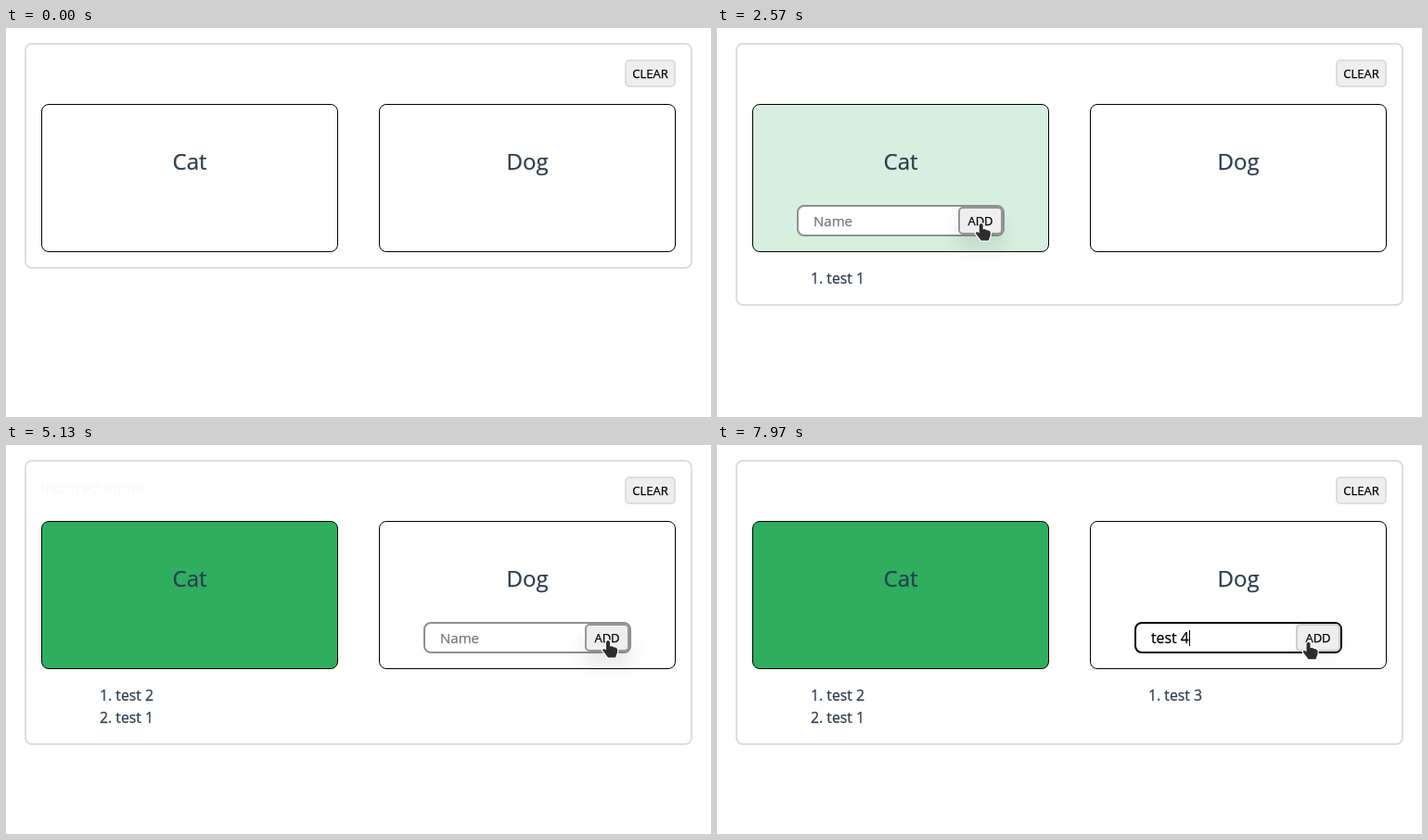
Animation of 760x420 px, one loop 8000 ms. Source, as an HTML page:

```html
<!DOCTYPE html>
<html lang="en">
<head>
<meta charset="utf-8">
<title>Cat or Dog</title>
<style>
  html, body { margin: 0; width: 100%; height: 100%; overflow: hidden; background: #fff; }
  body { position: relative; font: 15.8px/24px "Open Sans", "Noto Sans", sans-serif;
    color: #2c3e50; -webkit-text-stroke: 0.25px; }
  div, svg { position: absolute; box-sizing: border-box; white-space: pre; }
  #panel { left: 20px; top: 16px; width: 720px; border: 2px solid #ddd; border-radius: 8px; }
  .button { border: 2px solid #ddd; border-radius: 5px; background: #eee; color: #000;
    font-size: 13px; line-height: 26px; text-align: center; }
  #clear { left: 667px; top: 34px; width: 55px; height: 30px; }
  #error { left: 38px; top: 34px; font-size: 15.6px; color: #d4160f; }
  .card { top: 82px; width: 320px; height: 160px; border: 1px solid #000; border-radius: 8px; }
  .title { left: 0; right: 0; top: 49px; font-size: 24px; text-align: center; }
  .field { top: 191px; height: 34px; border: 2px solid #909090; border-radius: 8px; background: #fff; }
  .text { left: 16px; right: 60px; top: 0; height: 30px; line-height: 30px; overflow: hidden; }
  .caret { top: 7px; width: 1px; height: 17px; background: #000; }
  .field .button { right: 0; top: 0; width: 48px; height: 30px; }
  .list { top: 258px; }
  #cursor { left: 0; top: 0; width: 760px; height: 420px; }
</style>
</head>
<body>
<div id="panel"></div>
<div id="error">Incorrect input!</div>
<div id="clear" class="button">CLEAR</div>
<script>
const LOOP = 8000, KEY = 70, ADD_X = 247, ADD_Y = 211;

const cards = [
  { name: 'Cat', x: 38, enter: 900, leave: 4120 },
  { name: 'Dog', x: 402, enter: 4253, leave: Infinity }
];
// The pointer reaches (x, y) at time `at`, a word is typed, and ADD is pressed at `send`.
const visits = [
  { card: cards[0], at: 1220, x: 195, y: 200, word: 'test 1', send: 2430 },
  { card: cards[0], at: 2850, x: 224, y: 211, word: 'test 2', send: 3770 },
  { card: cards[1], at: 4330, x: 572, y: 225, word: '', send: 5110 },
  { card: cards[1], at: 6000, x: 602, y: 214, word: 'test 3', send: 6900 },
  { card: cards[1], at: 7250, x: 605, y: 218, word: 'test 4', send: 8127 }
];
const wrong = visits.findIndex(v => !v.word);
const shapes = {
  arrow: 'M0 0V16L4 12.5 6.5 18.5 9.3 17.3 6.8 11.6H11.8Z',
  hand: 'M-2 1.5Q0-1.5 2 1.5V6.5L4 6 6 7.2 8 7.4 10 9V13L8 18.5H0L-6 10.5Q-5 8-2 10.5Z',
  beam: 'M-3-7.5H-1L0-7 1-7.5H3M-3 7.5H-1L0 7 1 7.5H3M0-7V7'
};

const $ = id => document.getElementById(id);
const clamp = p => Math.max(0, Math.min(1, p));
const ease = p => p * p * (3 - 2 * p);
const mix = (a, b, p) => a + (b - a) * p;
// Eased rise after `on` and fall after `off`.
const pulse = (t, on, off, rise, fall = rise) =>
  ease(clamp(Math.min((t - on) / rise, 1 - (t - off) / fall)));

function add(parent, cls, text = '') {
  const el = document.createElement('div');
  el.className = cls;
  el.textContent = text;
  parent.append(el);
  return el;
}

const pen = document.createElement('canvas').getContext('2d');
pen.font = '15.8px "Open Sans", "Noto Sans", sans-serif';

for (const c of cards) {
  c.box = add(document.body, 'card');
  c.box.style.left = c.x + 'px';
  add(c.box, 'title', c.name);
  c.field = add(document.body, 'field');
  c.value = add(c.field, 'text');
  c.caret = add(c.field, 'caret');
  c.button = add(c.field, 'button', 'ADD');
  c.items = add(document.body, 'list');
  c.items.style.left = c.x + 63 + 'px';
  c.visits = visits.filter(v => v.card === c);
}
document.body.insertAdjacentHTML('beforeend',
  '<svg id="cursor"><g id="tip"><path id="halo" fill="none" stroke="#fff"/><path id="shape"/></g></svg>');

// Pointer stops: a rest at each spot while typing, then a rest on ADD.
const path = [[700, 262, 20]];
for (const v of visits) {
  const x = v.card.x + ADD_X;
  path.push([v.at, v.x, v.y]);
  if (v.word) path.push([v.at + 570, v.x, v.y]);
  path.push([v.send - 80, x, ADD_Y], [v.send + 130, x, ADD_Y]);
}

// Even key strokes, with a pause before the digit.
function typed(v, t) {
  const since = t - v.at - 130;
  const count = Math.min(5, Math.floor(since / KEY) + 1);
  return v.word.slice(0, since > 530 ? 6 : Math.max(0, count));
}

const listed = (c, t) => c.visits.filter(v => v.word && v.send <= t).map(v => v.word).reverse();

function drawCard(c, t) {
  const open = pulse(t, c.enter, c.leave, 500, 150);
  const width = mix(66, 224, open);
  const active = c.visits.find(v => v.word && t >= v.at && t < v.send);
  const text = active ? typed(active, t) : '';
  const hover = Math.max(...c.visits.map(v => pulse(t, v.send - 230, v.send + 200, 250)));
  const grey = Math.round(mix(221, 150, hover));

  Object.assign(c.field.style, {
    opacity: open,
    left: c.x + 160 - width / 2 + 'px',
    width: width + 'px',
    borderColor: active ? '#000' : '#909090'
  });
  c.value.textContent = text || 'Name';
  c.value.style.color = text ? '#000' : '#757575';
  c.value.style.fontSize = text ? '' : '15px';
  c.caret.style.left = 16 + Math.round(pen.measureText(text).width) + 'px';
  c.caret.style.visibility = active ? 'visible' : 'hidden';
  c.button.style.borderColor = `rgb(${grey},${grey},${grey})`;
  c.button.style.boxShadow = `0 15px 20px rgba(0,0,0,${0.1 * hover})`;
  c.items.textContent = listed(c, t).map((s, i) => `${i + 1}. ${s}`).join('\n');
}

function cursorKind(x, y, t) {
  const c = cards.find(c => t > c.enter && t < c.leave && x >= c.x + 48 && x < c.x + 272);
  if (!c || y < 191 || y > 222) return 'arrow';
  return x < c.x + 222 ? 'beam' : 'hand';
}

function drawCursor(t) {
  const i = path.findIndex(k => k[0] > t);
  $('cursor').style.visibility = i < 1 ? 'hidden' : 'visible';
  if (i < 1) return;
  const [from, x0, y0] = path[i - 1], [to, x1, y1] = path[i];
  const p = ease((t - from) / (to - from));
  const x = mix(x0, x1, p), y = mix(y0, y1, p);
  const kind = cursorKind(x, y, t);
  const beam = kind === 'beam';
  $('tip').setAttribute('transform', `translate(${x} ${y})`);
  $('halo').setAttribute('d', shapes[kind]);
  $('halo').setAttribute('stroke-width', beam ? 3 : 2.4);
  $('shape').setAttribute('d', shapes[kind]);
  $('shape').setAttribute('fill', beam ? 'none' : '#2e2e2e');
  $('shape').setAttribute('stroke', beam ? '#333' : 'none');
}

function draw(t) {
  const rows = Math.max(...cards.map(c => listed(c, t).length));
  $('panel').style.height = (rows ? 260 + 24 * rows : 244) + 'px';
  $('error').style.opacity = pulse(t, visits[wrong].send - 30, visits[wrong + 1].send, 500);
  cards[0].box.style.background = `rgba(47,174,96,${pulse(t, visits[0].send, Infinity, 500)})`;
  cards.forEach(c => drawCard(c, t));
  drawCursor(t);
}

const start = performance.now();
function frame() {
  draw((performance.now() - start) % LOOP);
  requestAnimationFrame(frame);
}
frame();
</script>
</body>
</html>
```
